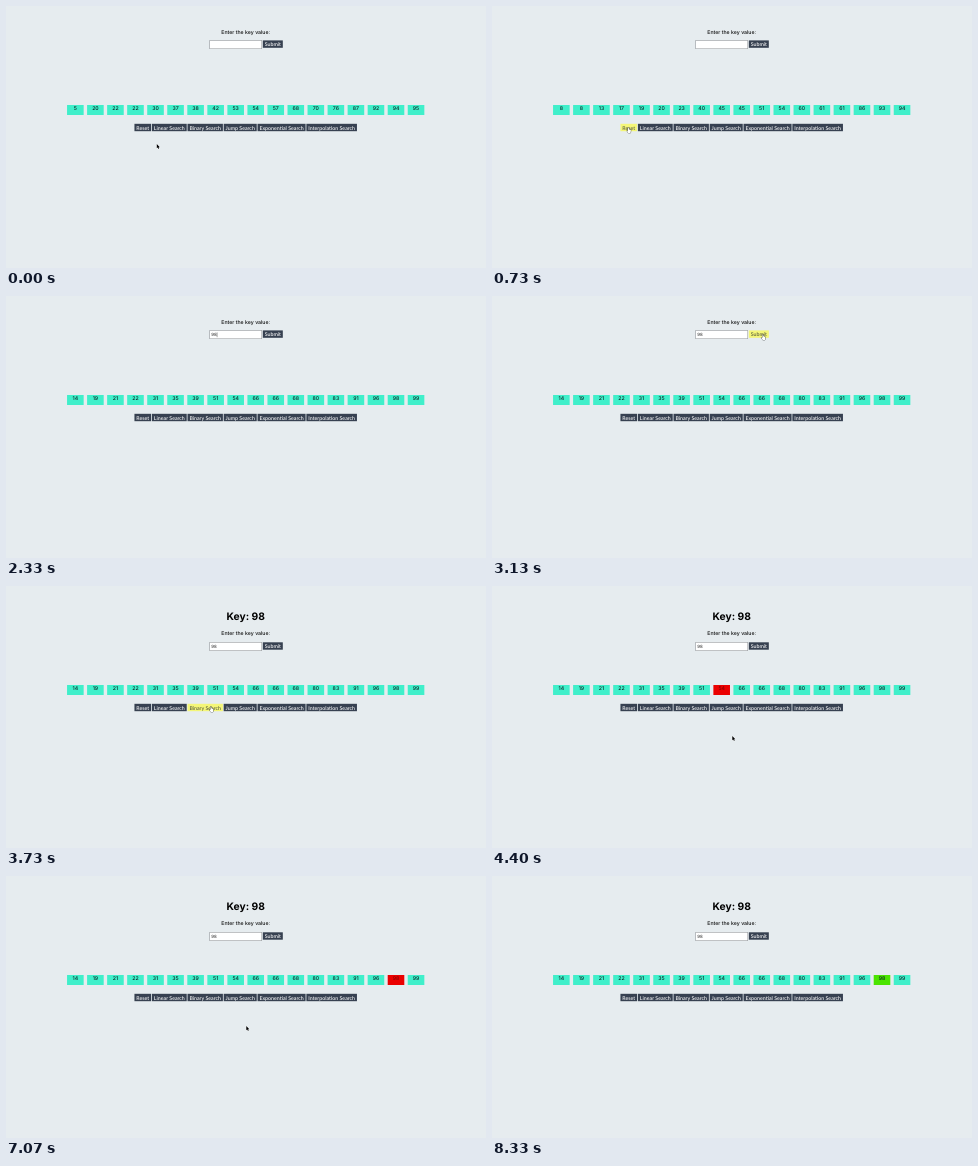
Recreate the animation shown at these times as an HTML page with a canvas. Size 480 by 262 pixels, loop 8390 ms.

```html
<!DOCTYPE html>
<html lang="en">
<head>
<meta charset="utf-8">
<title>Search visualizer</title>
<style>
  html, body { margin: 0; width: 100%; height: 100%; overflow: hidden; background: #e6ecef; }
  canvas { display: block; width: 480px; height: 262px; }
</style>
</head>
<body>
<canvas id="stage"></canvas>
<script>
const WIDTH = 480, HEIGHT = 262, MIDDLE = 239.7, LOOP = 8390, TICK = 1000 / 15;
const BACK = '#e6ecef', SLATE = '#374151', YELLOW = '#f4f678', OLIVE = '#55593f';
const TEAL = '#40efca', RED = '#eb0000', GREEN = '#4be400';
const UI = 'Inter, "Liberation Sans", sans-serif';
const SMALL = `500 5.2px ${UI}`, HEADING = `bold 10.3px ${UI}`, TYPED = `4.4px ${UI}`;
const BUTTON = '500 5.25px Lato, sans-serif';

// Moments of the session, in ms.
const RESETS = [400, 670, 1000];
const FOCUS = 1870, TYPING = 2270, KEY_GAP = 60, TYPING_END = 2670;
const SUBMIT = 3270, SEARCH = 4000, STEP = 1000, POINTER_GONE = 8200;
const KEY = '98', SHIFT = 21.9;

const canvas = document.getElementById('stage');
const ctx = canvas.getContext('2d');
const ratio = window.devicePixelRatio || 1;
canvas.width = WIDTH * ratio;
canvas.height = HEIGHT * ratio;
ctx.scale(ratio, ratio);
ctx.textRendering = 'geometricPrecision';

const FIRST = '5 20 22 22 30 37 38 42 53 54 57 68 70 76 87 92 94 95'.split(' ');
const LAST = '14 19 21 22 31 35 39 51 54 66 66 68 80 83 91 96 98 99'.split(' ');

function shuffled(seed) {
  const next = () => (seed = (seed * 16807) % 2147483647) / 2147483647;
  return FIRST.map(() => 1 + Math.floor(next() * 99)).sort((a, b) => a - b);
}
const DEALS = [FIRST, shuffled(4211), shuffled(9173), LAST];

function binarySearch(values, key) {
  const probes = [];
  let low = 0, high = values.length - 1;
  while (low <= high) {
    const index = (low + high) >> 1;
    probes.push({ index, color: RED });
    if (values[index] === key) return [...probes, { index, color: GREEN }];
    if (+values[index] < +key) low = index + 1;
    else high = index - 1;
  }
  return probes;
}
const PROBES = binarySearch(LAST, KEY);

const textWidth = (string, font) => {
  ctx.font = font;
  return ctx.measureText(string).width;
};

// The search buttons share one centred row with equal padding.
const ROW_WIDTH = 222.5, GAP = 0.8, BUTTON_HEIGHT = 7.4;
const LABELS = ['Reset', ...['Linear', 'Binary', 'Jump', 'Exponential', 'Interpolation']
  .map(name => `${name} Search`)];
const labelWidths = LABELS.map(label => textWidth(label, BUTTON));
const contentWidth = labelWidths.reduce((sum, w) => sum + w, GAP * (LABELS.length - 1));
const PAD = (ROW_WIDTH - contentWidth) / (2 * LABELS.length);
let rowX = MIDDLE - ROW_WIDTH / 2;
const SEARCH_BUTTONS = LABELS.map((label, i) => {
  const button = { label, x: rowX, y: 117.8, w: labelWidths[i] + 2 * PAD, h: BUTTON_HEIGHT };
  rowX += button.w + GAP;
  return button;
});

const HOME = { x: 150.8, y: 138 };
const MOVES = [
  { from: 0, to: 340, x: 136.5, y: 121.5 },
  { from: 1000, to: 1530, x: 219.2, y: 43.3 },
  { from: 1530, to: 1800, x: 234, y: 38 },
  { from: TYPING_END, to: 3130, x: 271, y: 38.5 },
  { from: SUBMIT, to: 3730, x: 205, y: 120.5 },
  { from: SEARCH, to: 4330, x: 240.3, y: 150 }
];

function pointerAt(t) {
  return MOVES.reduce((p, move) => {
    const u = Math.min(1, Math.max(0, (t - move.from) / (move.to - move.from)));
    const ease = u * u * (3 - 2 * u);
    return { x: p.x + (move.x - p.x) * ease, y: p.y + (move.y - p.y) * ease };
  }, HOME);
}

const contains = (box, p) =>
  p.x >= box.x && p.x <= box.x + box.w && p.y >= box.y && p.y <= box.y + box.h;

function rect(x, y, w, h, color) {
  ctx.fillStyle = color;
  ctx.fillRect(x, y, w, h);
}

function text(string, x, baseline, font, color, align = 'center') {
  ctx.font = font;
  ctx.fillStyle = color;
  ctx.textAlign = align;
  ctx.fillText(string, x, baseline);
}

function drawButton({ label, x, y, w, h }, hover) {
  rect(x, y, w, h, hover ? YELLOW : SLATE);
  text(label, x + w / 2, y + 5.7, BUTTON, hover ? OLIVE : '#fff');
}

function drawInput({ x, y, w, h }, t) {
  rect(x, y, w, h, '#8d9195');
  rect(x + 0.5, y + 0.5, w - 1, h - 1, '#fff');
  const count = t < TYPING ? 0 : 1 + Math.floor((t - TYPING) / KEY_GAP);
  const typed = KEY.slice(0, count);
  text(typed, x + 1.8, y + 6.1, TYPED, '#222', 'left');
  if (t >= FOCUS && t < TYPING_END) {
    rect(x + 2 + textWidth(typed, TYPED), y + 2.2, 0.4, 4.8, '#222');
  }
}

function drawCells(t) {
  const values = DEALS[RESETS.filter(at => t >= at).length];
  const step = Math.floor((t - SEARCH) / STEP);
  const probe = PROBES[Math.min(step, PROBES.length - 1)];
  const pitch = 20.04, width = 16.6;
  values.forEach((value, i) => {
    const center = MIDDLE + (i - (values.length - 1) / 2) * pitch;
    const color = probe && probe.index === i ? probe.color : TEAL;
    rect(center - width / 2, 99, width, 10, color);
    text(value, center, 104.2, SMALL, color === RED ? '#850000' : '#0c2626');
  });
}

function shape(p, points, fill, stroke) {
  ctx.beginPath();
  points.forEach(([x, y]) => ctx.lineTo(p.x + x, p.y + y));
  ctx.closePath();
  ctx.lineJoin = 'round';
  ctx.strokeStyle = stroke;
  ctx.lineWidth = 0.6;
  ctx.stroke();
  ctx.fillStyle = fill;
  ctx.fill();
}

function drawArrow(p) {
  shape(p, [[0, 0], [0, 4.3], [1, 3.5], [1.7, 5], [2.3, 4.7], [1.8, 3.3], [3, 3.2]],
    '#000', '#fff');
}

function drawHand(p) {
  shape(p, [[-0.5, 0], [0.3, 0], [0.4, 1.8], [2.4, 2.4], [2, 5.4], [-0.3, 5.4], [-1.6, 3.2],
    [-0.5, 3.2]], '#fff', '#111');
}

function drawBeam({ x, y }) {
  rect(x - 0.25, y - 2.6, 0.5, 5.2, '#222');
  for (const end of [-2.8, 2.4]) rect(x - 0.9, y + end, 1.8, 0.4, '#222');
}

function draw(t) {
  const submitted = t >= SUBMIT, shift = submitted ? SHIFT : 0;
  const input = { x: 203.4, y: 34.2 + shift, w: 52.6, h: 8.8 };
  const submit = { label: 'Submit', x: input.x + input.w + GAP, y: 34.4 + shift,
    w: textWidth('Submit', BUTTON) + 2 * PAD, h: BUTTON_HEIGHT };
  const buttons = [submit, ...SEARCH_BUTTONS];
  const pointer = pointerAt(Math.floor((t + 4) / TICK) * TICK);
  const hidden = (t >= TYPING && t < TYPING_END) || t >= POINTER_GONE;
  const hovered = !hidden && buttons.find(box => contains(box, pointer));

  rect(0, 0, WIDTH, HEIGHT, BACK);
  if (submitted) text(`Key: ${KEY}`, MIDDLE, 34.4, HEADING, '#000');
  text('Enter the key value:', MIDDLE, 27.5 + shift, SMALL, '#111');
  drawInput(input, t);
  drawCells(t);
  buttons.forEach(box => drawButton(box, box === hovered));

  if (hidden) return;
  if (hovered) drawHand(pointer);
  else if (contains(input, pointer)) drawBeam(pointer);
  else drawArrow(pointer);
}

const start = performance.now();
function loop() {
  draw((performance.now() - start) % LOOP);
  requestAnimationFrame(loop);
}
loop();
</script>
</body>
</html>
```
